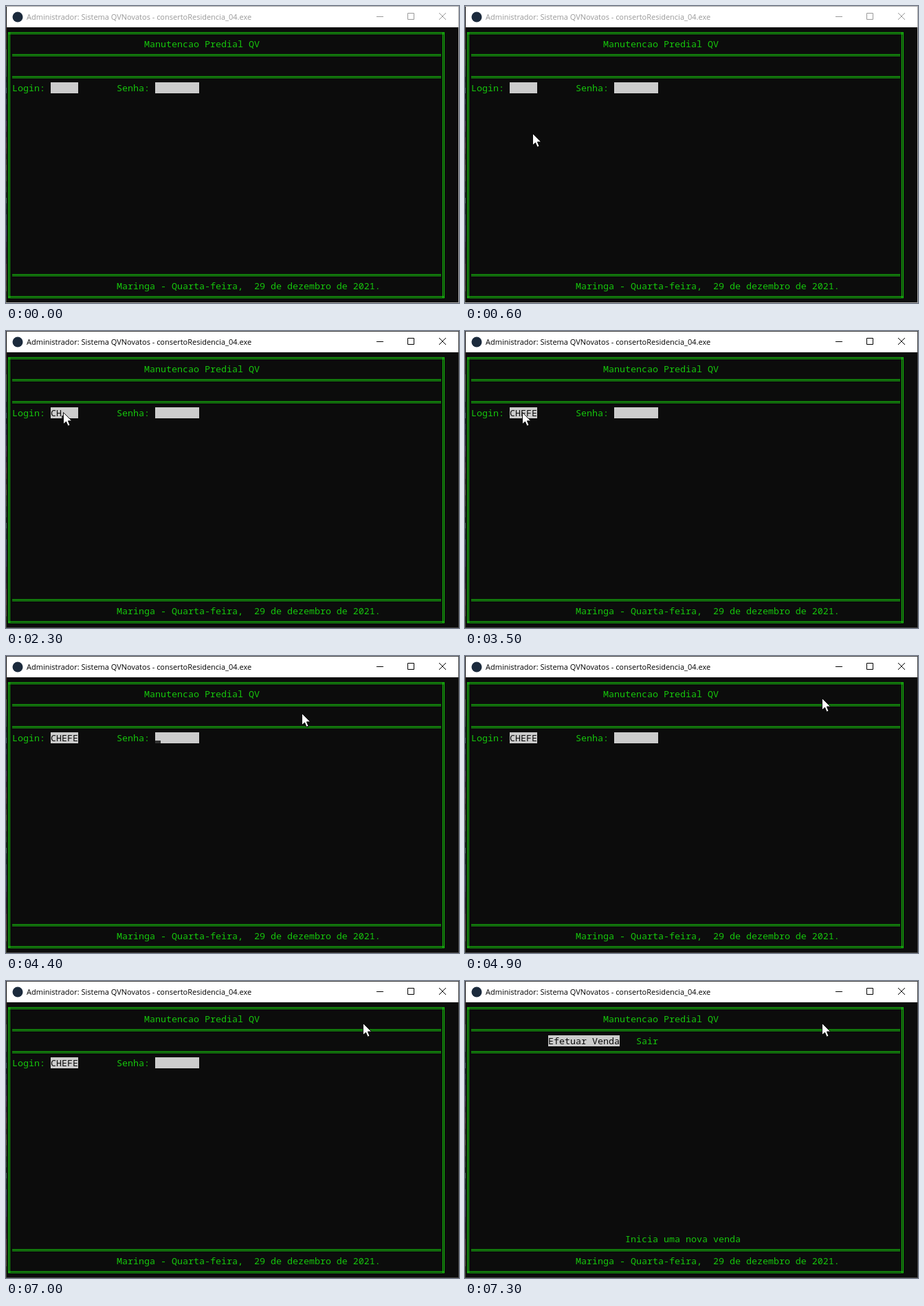
These frames come from a looping animation (659 px wide and 432 px high, 8000 ms). An HTML page:

```html
<!DOCTYPE html>
<html lang="pt">
<head>
<meta charset="utf-8">
<title>Console</title>
<style>
  html, body { margin: 0; width: 100%; height: 100%; overflow: hidden; background: #0c0c0c; }
  svg { display: block; }
  rect { shape-rendering: crispEdges; }
  text { white-space: pre; font: 13.333px "Noto Sans Mono", "DejaVu Sans Mono", monospace; fill: #16c60c; }
  text.dark { fill: #0c0c0c; }
  #caption { font: 11px "Open Sans", "Noto Sans", sans-serif; fill: #000; }
  #controls { fill: none; stroke: #000; }
  #border { fill: none; stroke: #444; shape-rendering: crispEdges; }
  .inactive #caption { fill: #999; }
  .inactive #controls { stroke: #999; }
  .inactive #border { stroke: #aaa; }
</style>
</head>
<body>
<svg id="stage" width="659" height="432" viewBox="0 0 659 432">
  <rect width="659" height="432" fill="#0c0c0c"/>
  <rect x="1" y="1" width="657" height="30" fill="#fff"/>
  <path id="border" d="M0 .5H658.5V431.5H0"/>
  <g id="desktop"></g>
  <circle cx="17" cy="16" r="7.5" fill="#1b2a3c"/>
  <text id="caption" x="30" y="20">Administrador: Sistema QVNovatos - consertoResidencia_04.exe</text>
  <path id="controls" d="M539 15.5h10M584.5 10.5h9v9h-9zM630 10l10 10M640 10l-10 10"/>
  <g id="frame"></g>
  <g id="labels"></g>
  <g id="login"></g>
  <g id="menu"></g>
  <path id="pointer" d="M.5 .5V17.5L4.5 13.9L7.2 20.2L10 19L7.4 12.8H12.8Z" fill="#fff" stroke="#000" stroke-width=".9"/>
</svg>
<script>
const LOOP = 8000, FRAME = 100, BLINK = 500;
const LINE = '#16c60c';
const $ = id => document.getElementById(id);

function add(parent, tag, attrs, content = '') {
  const el = document.createElementNS('http://www.w3.org/2000/svg', tag);
  for (const key in attrs) el.setAttribute(key, attrs[key]);
  el.textContent = content;
  return $(parent).appendChild(el);
}
const box = (parent, x, y, width, height, fill) => add(parent, 'rect', { x, y, width, height, fill });

// Console cells are 8 x 16, with the first one at (1, 31).
const cellX = col => 1 + col * 8;
const cellY = row => 31 + row * 16;
const write = (parent, col, row, content, cls = '') =>
  add(parent, 'text', { x: cellX(col), y: cellY(row) + 13, class: cls }, content);
const field = (parent, col, row, cells) =>
  box(parent, cellX(col), cellY(row), cells * 8, 16, '#ccc');

// Slivers of the desktop left of the window
for (let y = 31; y < 431; y += 8) {
  const light = 14 + 22 * Math.abs(Math.sin(y * y));
  box('desktop', 0, y, 1, 8, `hsl(${y * 47 % 360} 20% ${light}%)`);
}

for (const x of [3, 5, 635, 637]) box('frame', x, 38, 1, 387, LINE);
for (const row of [0, 2, 4, 22, 24]) {
  const outer = row % 24 === 0;
  for (const dy of [7, 9])
    box('frame', outer ? 3 : 9, cellY(row) + dy, outer ? 635 : 624, 1, LINE);
}

write('labels', 25, 1, 'Manutencao Predial QV');
write('labels', 20, 23, 'Maringa - Quarta-feira,  29 de dezembro de 2021.');

write('login', 1, 5, 'Login:');
write('login', 20, 5, 'Senha:');
field('login', 8, 5, 5);
field('login', 27, 5, 8);
const user = write('login', 8, 5, '', 'dark');
const caret = box('login', 0, 123, 8, 4, '#333');

field('menu', 15, 3, 13);
write('menu', 15, 3, 'Efetuar Venda', 'dark');
write('menu', 31, 3, 'Sair');
const hint = write('menu', 29, 21, 'Inicia uma nova venda');

// Pointer strokes: cubic curves from start to end, resting in between
const REST = [83, 118], TURN = [430, 83];
const STROKES = [
  { from: 200, to: 800, curve: [[14, 9], [50, 150], [140, 264], [83, 114]] },
  { from: 1100, to: 1600, curve: [[83, 114], [92, 112], [92, 126], REST] },
  { from: 4100, to: 4400, curve: [REST, [120, 170], [300, 170], TURN] },
  { from: 4400, to: 4900, curve: [TURN, [500, 30], [515, 25], [519, 61]] }
];

function pointerAt(t) {
  const { from, to, curve: [a, b, c, d] } = STROKES.findLast(s => s.from <= t);
  const u = Math.min(1, (t - from) / (to - from)), v = 1 - u;
  return [0, 1].map(i => Math.round(
    v ** 3 * a[i] + 3 * v * v * u * b[i] + 3 * v * u * u * c[i] + u ** 3 * d[i]));
}

// The first press focuses the login; five letters later the caret moves to the password.
const USER = 'CHEFE';
const PRESSES = [1500, 2200, 2300, 2800, 2900, 3000, 5600, 5800, 6600, 6800];

function drawTyping(t) {
  const count = PRESSES.filter(time => time <= t).length;
  user.textContent = USER.slice(0, Math.max(0, count - 1));
  caret.setAttribute('x', cellX(count <= USER.length ? 7 + count : 21 + count));
  // A press shows the caret; a steady clock then toggles it.
  const ticks = Math.floor(t / BLINK) - Math.floor(PRESSES[count - 1] / BLINK);
  show(caret, ticks % 2 === 0);
}

const show = (el, on) => el.setAttribute('visibility', on ? 'inherit' : 'hidden');

function draw(now) {
  const t = Math.floor(now % LOOP / FRAME) * FRAME;
  $('stage').classList.toggle('inactive', t < 1000);
  show($('pointer'), t >= STROKES[0].from);
  if (t >= STROKES[0].from)
    $('pointer').setAttribute('transform', `translate(${pointerAt(t)})`);
  drawTyping(t);
  show($('login'), t < 7100);
  show($('menu'), t >= 7200);
  show(hint, t >= 7300);
}

const start = performance.now();
function tick() {
  draw(Math.max(0, performance.now() - start));
  requestAnimationFrame(tick);
}
tick();
</script>
</body>
</html>
```
